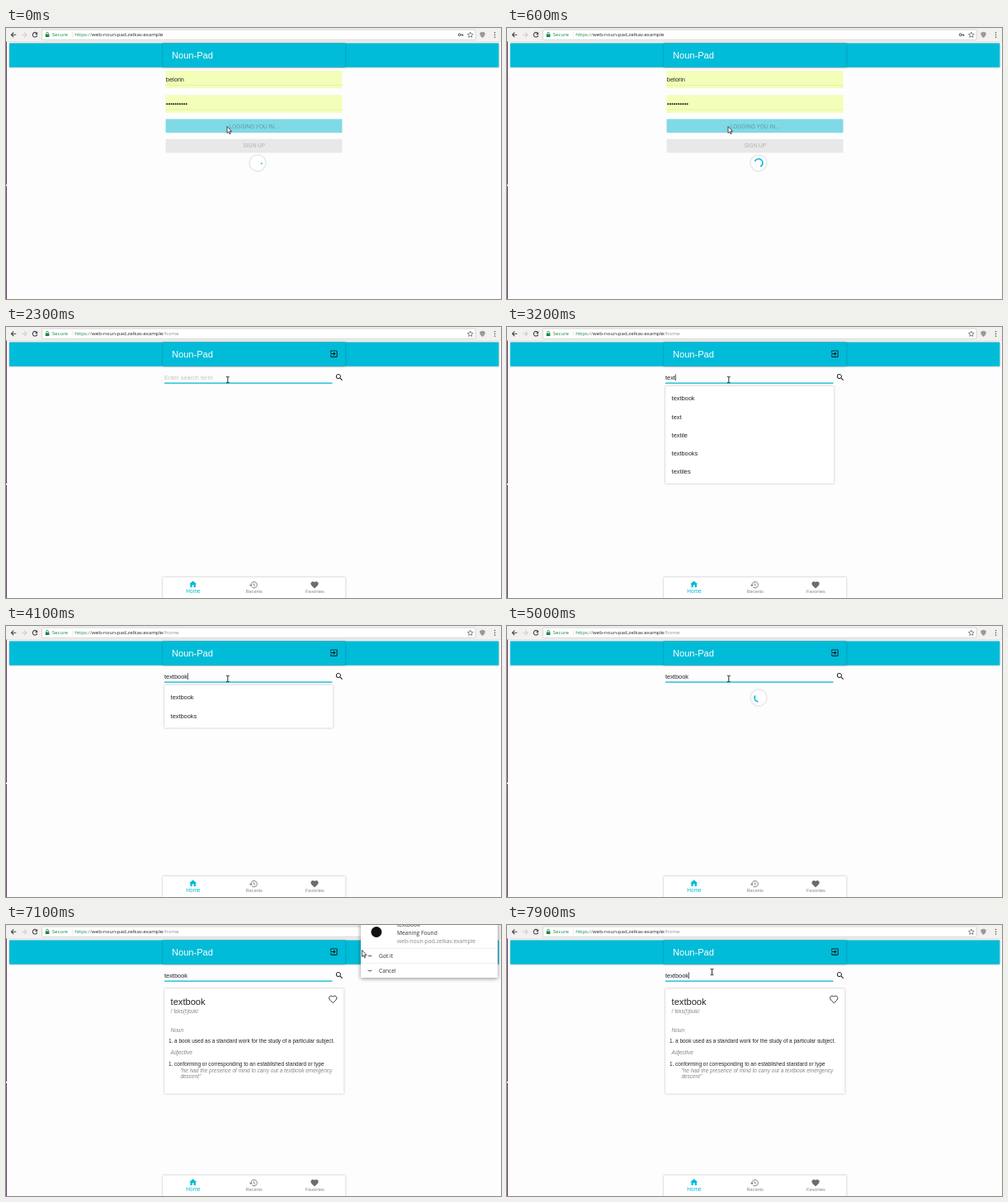
These frames come from a looping animation (600x329 px, 8 s). An HTML page:

```html
<!DOCTYPE html>
<html lang="en">
<head>
<meta charset="utf-8">
<title>Dictionary search</title>
<style>
  html, body { margin: 0; width: 100%; height: 100%; overflow: hidden; background: #fefdfe; }
  svg { display: block; width: 100vw; height: 100vh; }
  text { font-family: "Liberation Sans", Arial, sans-serif; font-size: 7.4px; fill: #222; white-space: pre; }
  .ui { font-family: "Open Sans", "Noto Sans", sans-serif; font-size: 6.11px; }
  .note text { font-family: "Open Sans", "Noto Sans", sans-serif; font-size: 6.73px; fill: #333; }
  .sm { font-size: 6.475px; }
  .xs { font-size: 5.55px; }
  .lg { font-size: 11.1px; }
  .mid { text-anchor: middle; }
  .it { font-style: italic; }
  .grey { fill: #858585; }
  .paper { fill: #fff; filter: drop-shadow(0 .5px 1px rgba(0,0,0,.3)); }
  .line { fill: none; stroke: #444; stroke-width: 1.1; }
</style>
</head>
<body>
<svg viewBox="0 0 600 329" preserveAspectRatio="none">
  <defs>
    <path id="heart" d="M12 21.35l-1.45-1.32C5.4 15.36 2 12.28 2 8.5 2 5.42 4.42 3 7.5 3c1.74 0 3.41.81 4.5 2.09C13.09 3.81 14.76 3 16.5 3 19.58 3 22 5.42 22 8.5c0 3.78-3.4 6.86-8.55 11.54z"/>
  </defs>
  <rect width="600" height="329" fill="#fefdfe"/>

  <!-- browser bar -->
  <rect width="600" height="16.5" fill="#f2f1f0"/>
  <path d="M0 16.5H600" stroke="#dddcdb" stroke-width=".6"/>
  <path d="M.5 16.5V190M.5 192V329" stroke="#683a62" stroke-width="1"/>
  <rect x="43.5" y="2" width="525.5" height="12.4" rx="1" fill="#fff" stroke="#c9c8c7" stroke-width=".7"/>
  <path class="line" d="M12.3 8.2H6.6M9.2 5.4L6.4 8.2L9.2 11"/>
  <path class="line" style="stroke:#cfcfcf" d="M19.2 8.2H25M22.2 5.4L25 8.2L22.2 11"/>
  <g id="reload"><path class="line" d="M37.2 6.3A2.8 2.8 0 1 0 37.8 9"/><path d="M38.2 4.9V8H35.1z" fill="#444"/></g>
  <path id="stop" class="line" d="M32.3 5.6L37.6 10.9M37.6 5.6L32.3 10.9"/>
  <rect x="47.8" y="7.4" width="4.6" height="3.7" rx=".4" fill="#148a43"/>
  <path d="M48.8 7.6V6.5a1.3 1.3 0 0 1 2.6 0V7.6" fill="none" stroke="#148a43" stroke-width=".8"/>
  <text class="ui" x="55.7" y="10.4" style="fill:#148a43">Secure</text>
  <path d="M80.3 4.5V12" stroke="#ddd" stroke-width=".6"/>
  <text class="ui" x="83.2" y="10.4"><tspan fill="#148a43">https</tspan><tspan fill="#777">://</tspan>web-noun-pad.zelkav.example<tspan id="path" fill="#8c8c8c">/home</tspan></text>
  <g id="key" class="line" style="stroke-width:1"><circle cx="549.7" cy="8.2" r="1.4"/><path d="M551.1 8.2H554.4M553.6 8.2V9.8"/></g>
  <path d="M562.8 5l1 2.2 2.4.2-1.8 1.6.5 2.3-2.1-1.2-2.1 1.2.5-2.3-1.8-1.6 2.4-.2z" fill="none" stroke="#555" stroke-width=".7"/>
  <path d="M577.5 5l2.8 1c.1 2.7-.9 4.4-2.8 5.6c-1.9-1.2-2.9-2.9-2.8-5.6z" fill="#9a9a9a" stroke="#777" stroke-width=".5"/>
  <g fill="#555"><circle cx="592.5" cy="5.5" r=".8"/><circle cx="592.5" cy="8.3" r=".8"/><circle cx="592.5" cy="11.1" r=".8"/></g>

  <!-- header -->
  <rect class="paper" x="4" y="18.5" width="593.3" height="29.2" style="fill:#00bcd8"/>
  <rect class="paper" x="190" y="18.5" width="221.3" height="29.2" style="fill:#00bcd8"/>
  <text class="lg" x="201" y="37" style="fill:#fff">Noun-Pad</text>
  <path id="exit" transform="translate(391.9 27) scale(.4625)" d="M10.09 15.59L11.5 17l5-5-5-5-1.41 1.41L12.67 11H3v2h9.67zM19 3H5c-1.11 0-2 .9-2 2v4h2V5h14v14H5v-4H3v4c0 1.1.89 2 2 2h14c1.1 0 2-.9 2-2V5c0-1.1-.9-2-2-2z" fill="#111"/>

  <g id="login">
    <rect x="193.3" y="52" width="214.2" height="21.3" fill="#f3feb8"/>
    <rect x="193.3" y="81.3" width="214.2" height="21.7" fill="#f3feb8"/>
    <path d="M193.3 69.5H407.5M193.3 99.1H407.5" stroke="#dfe6b0" stroke-width=".6"/>
    <text x="193.8" y="64.9">belorin</text>
    <path d="M195.2 92.2H219.5" stroke="#111" stroke-width="2" stroke-linecap="round" stroke-dasharray="0 2.6"/>
    <rect x="193.5" y="110.6" width="214" height="16.6" rx="1" fill="#80d9e6"/>
    <text class="sm mid" x="300.5" y="121.5" style="fill:#5a99a2">LOGGING YOU IN...</text>
    <rect x="193.5" y="134.7" width="214" height="16.8" rx="1" fill="#e9e8e9"/>
    <text class="sm mid" x="300.8" y="145.4" style="fill:#b0b0b0">SIGN UP</text>
  </g>

  <g id="home">
    <path d="M192 68.4H395.5" stroke="#e0e0e0" stroke-width=".6"/>
    <path id="focus" d="M192 68.1H395.5" stroke="#00bcd4" stroke-width="1.1"/>
    <text id="hint" x="192" y="63.7" style="fill:#c3c3c3">Enter search term</text>
    <text id="word" x="192" y="63.7"></text>
    <path id="caret" d="M0 57.3V65.2" stroke="#111" stroke-width=".7"/>
    <path transform="translate(398.5 55.5) scale(.4625)" d="M15.5 14h-.79l-.28-.27C15.41 12.59 16 11.11 16 9.5 16 5.91 13.09 3 9.5 3S3 5.91 3 9.5 5.91 16 9.5 16c1.61 0 3.09-.59 4.23-1.57l.27.28v.79l5 4.99L20.49 19zm-6 0C7.01 14 5 11.99 5 9.5S7.01 5 9.5 5 14 7.01 14 9.5 11.99 14 9.5 14z" fill="#111"/>
    <g id="menu"><rect id="sheet" class="paper" x="192" y="72" width="204.3"/><g id="items"></g></g>
  </g>

  <g id="card">
    <rect class="paper" x="192" y="77.2" width="217.5" height="127.6" rx=".8"/>
    <text class="lg" x="199.6" y="97">textbook</text>
    <text class="sm grey" x="199.6" y="107.2">/ˈtɛks(t)bʊk/</text>
    <use href="#heart" transform="translate(390.7 84.7) scale(.4625)" fill="none" stroke="#222" stroke-width="2"/>
    <text class="sm it grey" x="199.6" y="129.5">Noun</text>
    <text class="sm" x="197" y="143.4">1.</text>
    <text class="sm" x="204" y="143.4">a book used as a standard work for the study of a particular subject.</text>
    <text class="sm it grey" x="199.6" y="157.2">Adjective</text>
    <text class="sm" x="197" y="171">1.</text>
    <text class="sm" x="204" y="171">conforming or corresponding to an established standard or type</text>
    <text class="sm it grey" x="211.4" y="178.5">"he had the presence of mind to carry out a textbook emergency</text>
    <text class="sm it grey" x="211.4" y="185.8">descent"</text>
  </g>

  <g id="nav">
    <rect class="paper" x="190" y="303.8" width="221.3" height="27"/>
    <path transform="translate(221.1 306.8) scale(.4625)" d="M10 20v-6h4v6h5v-8h3L12 3 2 12h3v8z" fill="#00bcd4"/>
    <text class="sm mid" x="227" y="323.3" style="fill:#00bcd4">Home</text>
    <g transform="translate(294.6 307.5) scale(.4625)"><path d="M5 12a8 8 0 1 1 2.5 5.8M12.6 8V12.6L16 14.7" fill="none" stroke="#757575" stroke-width="2"/><path d="M1 12H9L5 16z" fill="#757575"/></g>
    <text class="xs mid grey" x="300.7" y="323.3">Recents</text>
    <use href="#heart" transform="translate(368.5 307.5) scale(.4625)" fill="#6c6c6c"/>
    <text class="xs mid grey" x="374.4" y="323.3">Favorites</text>
  </g>

  <g id="spinner">
    <circle class="paper" r="9.4"/>
    <circle id="arc" r="4.9" fill="none" stroke="#00bcd4" stroke-width="1.7" pathLength="1"/>
  </g>

  <g id="note" class="note">
    <rect x="430" y="-10" width="166" height="74" fill="#fff" style="filter:drop-shadow(0 1px 2.5px rgba(0,0,0,.45))"/>
    <circle cx="449" cy="8.5" r="6.5" fill="#111"/>
    <text x="474" y="1.7">textbook</text>
    <text x="474" y="11.6">Meaning Found</text>
    <text x="474" y="22.3" style="fill:#888">web-noun-pad.zelkav.example</text>
    <path d="M430 28.3H596M430 46.3H596" stroke="#e6e6e6" stroke-width=".7"/>
    <path d="M438.6 37c1.2 1 3.4 1 4.8 0M438.6 55c1.2 1 3.4 1 4.8 0" fill="none" stroke="#444" stroke-width="1"/>
    <text x="452" y="39.6">Got it</text>
    <text x="452" y="57.6">Cancel</text>
  </g>

  <path id="arrow" d="M0 0V8L1.8 6.4L3.1 9.2L4.3 8.6L3.1 5.9H5.5z" fill="#fff" stroke="#222" stroke-width=".8"/>
  <path id="beam" d="M-1.8 -3.6H-.5L0 -3L.5 -3.6H1.8M0 -3V3M-1.8 3.6H-.5L0 3L.5 3.6H1.8" fill="none" stroke="#111" stroke-width=".9"/>
</svg>

<script>
const LOOP = 8000;
const $ = {};
document.querySelectorAll('[id]').forEach(el => $[el.id] = el);

const clamp = v => Math.min(1, Math.max(0, v));
const ramp = (t, from, to) => clamp((t - from) / (to - from));
const easeOut = v => 1 - (1 - v) ** 2;
const easeOutQuint = v => 1 - (1 - v) ** 5;
const smooth = v => v * v * (3 - 2 * v);
const show = (el, on) => el.style.display = on ? '' : 'none';
const within = (t, a, b) => t >= a && t < b;

// time, x, y
const pointer = [
  [700, 268, 119.5], [1000, 268, 104], [1800, 268, 104], [2200, 268.8, 64],
  [5900, 268.8, 64], [6300, 488, 36], [6900, 488, 36], [7100, 431.5, 30.5], [7800, 248.5, 57]
];
const keyTimes = [2700, 2800, 2900, 3100, 3400, 3600, 3800, 4000];
const wide = ['textbook', 'text', 'textile', 'textbooks', 'textiles'];
const narrow = ['textbook', 'textbooks'];

function pointerAt(t) {
  const i = pointer.findIndex(p => p[0] > t);
  if (i === 0) return pointer[0].slice(1);
  if (i < 0) return pointer[pointer.length - 1].slice(1);
  const [t0, x0, y0] = pointer[i - 1], [t1, x1, y1] = pointer[i];
  const k = smooth(ramp(t, t0, t1));
  return [x0 + (x1 - x0) * k, y0 + (y1 - y0) * k];
}

let shownList;
function drawMenu(t) {
  const open = within(t, 2800, 4500);
  show($.menu, open);
  if (!open) return;
  const list = t < 3700 ? wide : narrow;
  if (list !== shownList) {
    shownList = list;
    $.sheet.setAttribute('height', 7.4 + 22.15 * list.length);
    $.items.innerHTML = list.map((w, i) => `<text x="199.6" y="${89.4 + 22.15 * i}">${w}</text>`).join('');
  }
  const sx = easeOutQuint(ramp(t, 2800, 3050)), sy = easeOutQuint(ramp(t, 2800, 3200));
  $.menu.setAttribute('transform', `translate(192 72) scale(${sx} ${sy}) translate(-192 -72)`);
  $.menu.setAttribute('opacity', sx * (1 - ramp(t, 4300, 4500)));
}

function drawSpinner(t) {
  const first = t < 1000;
  const on = first || within(t, 4730, 5300);
  show($.spinner, on);
  if (!on) return;
  const age = first ? t : t - 4730;
  const u = age % 1550;
  const grow = easeOut(ramp(u, 50, 900)), sweep = easeOut(ramp(u, 800, 1550));
  const start = .3 * grow + .7 * sweep;
  const len = Math.max(.05, Math.min(.7 * grow, 1 - start));
  $.spinner.setAttribute('transform', `translate(305 ${first ? 163.8 : 87})`);
  $.arc.setAttribute('stroke-dasharray', `${len} ${1 - len}`);
  $.arc.setAttribute('transform', `rotate(${age * .18 + start * 360})`);
}

function drawInput(t) {
  const typed = 'textbook'.slice(0, keyTimes.filter(k => t >= k).length);
  if ($.word.textContent !== typed) $.word.textContent = typed;
  show($.hint, !typed);
  const f = easeOutQuint(ramp(t, 2000, 2300));
  $.focus.setAttribute('transform', `translate(293.75 0) scale(${f} 1) translate(-293.75 0)`);
  show($.focus, f > 0);
  const caret = within(t, 2600, 4400) || t >= 7500;
  show($.caret, caret);
  if (caret) $.caret.setAttribute('transform', `translate(${192.4 + (typed ? $.word.getComputedTextLength() : 0)} 0)`);
}

function drawPointer(t) {
  const [x, y] = pointerAt(t);
  const overInput = t > 1000 && x < 396 && y > 52 && y < 70;
  show($.arrow, !overInput);
  show($.beam, overInput);
  (overInput ? $.beam : $.arrow).setAttribute('transform', `translate(${x} ${y})`);
}

function draw(t) {
  const home = t >= 1000, ready = t >= 1200, loading = within(t, 1000, 1600);
  show($.login, !home);
  show($.home, home);
  show($.path, home);
  show($.key, !ready);
  show($.nav, ready);
  show($.exit, ready);
  show($.stop, loading);
  show($.reload, !loading);
  show($.card, t >= 5300);
  const note = ramp(t, 5600, 5800) * (1 - ramp(t, 7700, 7880));
  show($.note, note > 0);
  $.note.setAttribute('opacity', note);
  if (home) drawInput(t);
  drawMenu(t);
  drawSpinner(t);
  drawPointer(t);
}

const began = performance.now();
function tick() {
  draw((performance.now() - began) % LOOP);
  requestAnimationFrame(tick);
}
tick();
</script>
</body>
</html>
```
